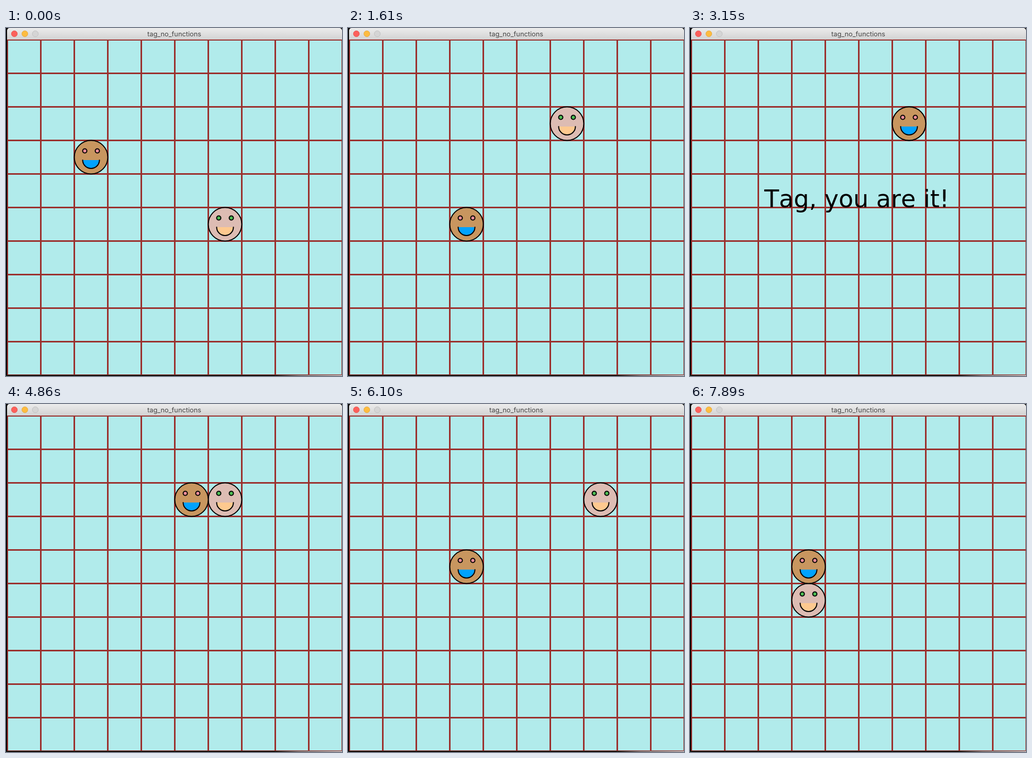
Animation of 642 by 664 pixels, one loop 8 s. Source, as an HTML page:

```html
<!DOCTYPE html>
<html lang="en">
<head>
<meta charset="utf-8">
<title>tag_no_functions</title>
<style>
html, body { margin: 0; width: 100%; height: 100%; overflow: hidden; background: #000; }
svg { display: block; }
.title { font: 12.8px Inter, Roboto, sans-serif; fill: #454545; text-anchor: middle; }
.message { font: 46px "DejaVu Sans", sans-serif; font-kerning: none; }
.face { stroke: #000; stroke-width: 2; stroke-linecap: round; }
</style>
</head>
<body>
<svg width="642" height="664" viewBox="0 0 642 664">
  <defs>
    <linearGradient id="bar" x2="0" y2="1">
      <stop offset="0" stop-color="#ececec"/>
      <stop offset="1" stop-color="#d2d2d2"/>
    </linearGradient>
    <linearGradient id="desk">
      <stop offset="0.8" stop-color="#10140f"/>
      <stop offset="0.87" stop-color="#777"/>
      <stop offset="1" stop-color="#b5b5b5"/>
    </linearGradient>
    <clipPath id="view"><rect x="2" y="22" width="640" height="640"/></clipPath>
  </defs>
  <rect width="642" height="664"/>
  <rect y="662" width="642" height="2" fill="url(#desk)"/>
  <path d="M2 22V5a5 5 0 0 1 5-5H637a5 5 0 0 1 5 5V22Z" fill="url(#bar)"/>
  <g stroke-width="0.8">
    <circle cx="16" cy="11" r="5.7" fill="#fc605b" stroke="#e2504b"/>
    <circle cx="36" cy="11" r="5.7" fill="#fdbc40" stroke="#e0a53a"/>
    <circle cx="56" cy="11" r="5.7" fill="#d5d5d5" stroke="#bdbdbd"/>
  </g>
  <text class="title" x="321.5" y="16">tag_no_functions</text>
  <g clip-path="url(#view)">
    <rect x="2" y="22" width="640" height="640" fill="#b1ebeb"/>
    <path id="grid" stroke="#9b302d" stroke-width="3"/>
    <g id="players"></g>
    <text id="message" class="message" x="142" y="342">Tag, you are it!</text>
  </g>
</svg>
<script>
const LOOP = 8000, CELL = 64;
const $ = id => document.getElementById(id);
const at = n => n * CELL + 0.5;

let lines = "";
for (let i = 0; i <= 10; i++) {
  lines += `M${2 + at(i)} 22V662M2 ${22 + at(i)}H642`;
}
$("grid").setAttribute("d", lines);

// Each move: [time, direction]; the start is a [column, row] cell.
const players = [
  {
    start: [6, 5], skin: "#ddbcb3", eyes: "#4fbf55", mouth: "#fec98f",
    moves: [[540, "U"], [750, "U"], [1020, "U"], [6100, "R"], [6280, "D"], [6550, "D"],
      [6730, "D"], [6810, "L"], [7080, "L"], [7440, "L"], [7890, "L"]]
  },
  {
    start: [2, 3], skin: "#c8965f", eyes: "#fc8e9b", mouth: "#00a2ff",
    moves: [[1250, "D"], [1430, "D"], [1610, "R"], [1790, "R"], [1960, "R"], [2230, "R"],
      [2490, "U"], [2700, "U"], [3150, "U"], [4860, "L"], [5310, "D"], [5480, "D"],
      [5750, "L"], [5920, "L"]]
  }
];
const STEP = { U: [0, -1], D: [0, 1], L: [-1, 0], R: [1, 0] };

$("players").innerHTML = players.map(p => `<g class="face">
  <circle r="32" fill="${p.skin}"/>
  <g fill="${p.eyes}"><circle cx="-12" cy="-12" r="4"/><circle cx="12" cy="-12" r="4"/></g>
  <path d="M-16 5.5A16 16 0 0 0 16 5.5" fill="${p.mouth}"/>
</g>`).join("");
players.forEach((p, i) => { p.node = $("players").children[i]; });

function draw(t) {
  for (const p of players) {
    let [col, row] = p.start;
    for (const [time, dir] of p.moves) {
      if (time > t) break;
      col += STEP[dir][0];
      row += STEP[dir][1];
    }
    p.node.setAttribute("transform", `translate(${34 + at(col)} ${54 + at(row)})`);
  }
  $("message").setAttribute("visibility", t >= 3150 && t < 4860 ? "visible" : "hidden");
}

function tick() {
  draw(performance.now() % LOOP);
  requestAnimationFrame(tick);
}
tick();
</script>
</body>
</html>
```
